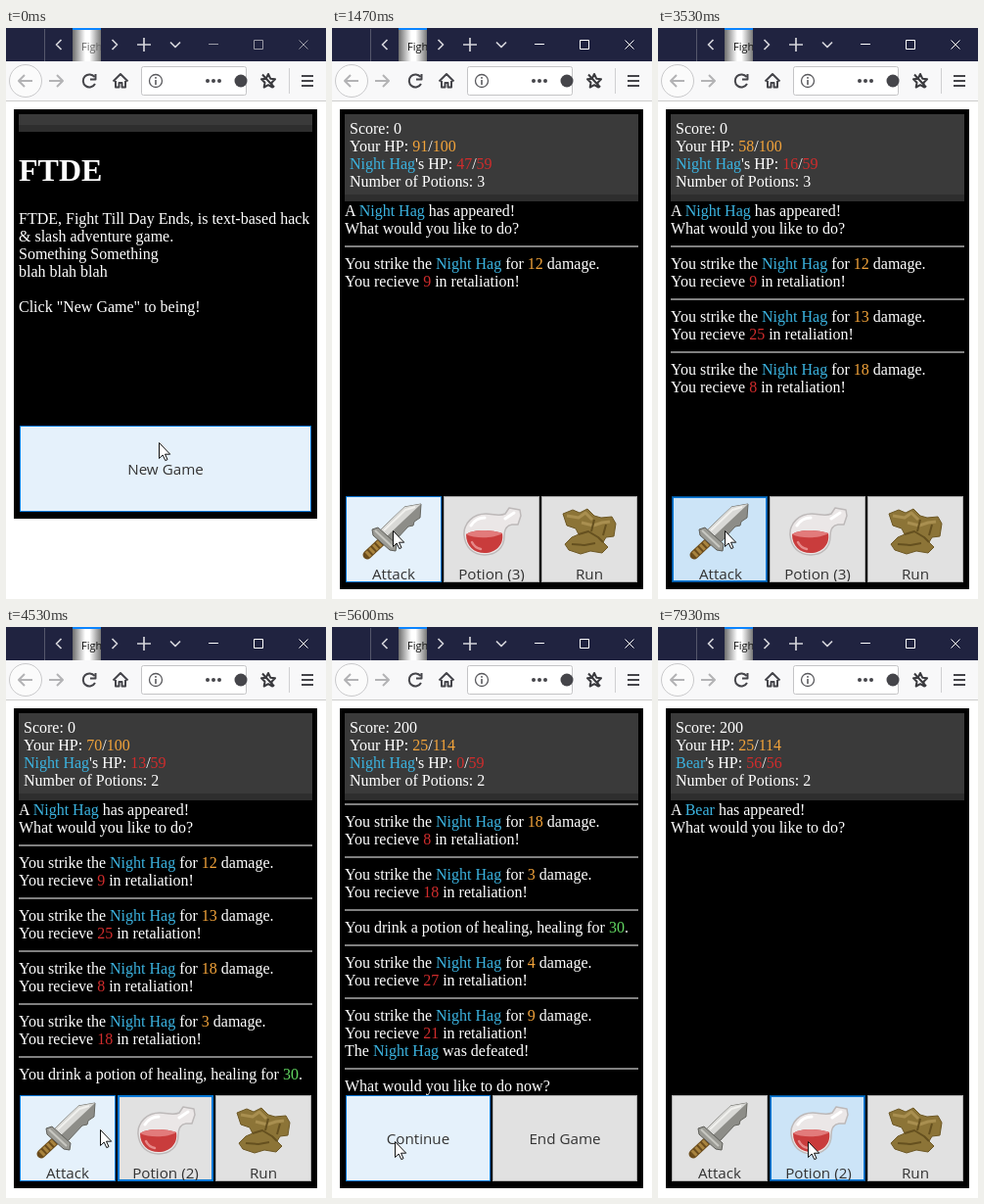
Animation of 327 by 583 pixels, one loop 8 s. Source, as an HTML page:

```html
<!DOCTYPE html>
<html lang="en">
<head>
<meta charset="utf-8">
<title>Fight Till Day Ends</title>
<style>
html, body { margin: 0; width: 100%; height: 100%; overflow: hidden; background: #fff; }
#stage { position: absolute; left: 0; top: 0; width: 327px; height: 583px; overflow: hidden; font: 16px/18px "Liberation Serif", "Times New Roman", serif; color: #fff; }
#stage > * { position: absolute; }
#chrome { left: 0; top: 0; }
#controls { stroke: #fff; }
.idle #controls { stroke: #9b9ba6; }
#tab { left: 68px; top: 0; width: 29px; height: 34px; overflow: hidden; background: linear-gradient(90deg, #6d6d6d, #fff 45%, #fff 60%, #777); border-top: 2px solid #0a84ff; box-sizing: border-box; font: 11px/33px "Open Sans", sans-serif; text-indent: 9px; white-space: nowrap; color: #111; }
.idle #tab { color: #666; }
#game { left: 8px; top: 83px; width: 310px; height: 490px; background: #000; }
#stats { left: 13px; top: 88px; width: 290px; height: 76px; padding: 6px 5px 7px; background: linear-gradient(#3a3a3a calc(100% - 7px), #2e2e2e 0); white-space: nowrap; }
#log { left: 13px; top: 178px; width: 302px; height: 300px; overflow: hidden; white-space: nowrap; }
#log hr { width: 300px; height: 2px; margin: 8px 0; border: 0; background: #808080; }
.start #game { height: 418px; }
.start #stats { height: 5px; }
.start #log { top: 106px; }
h1 { margin: 21px 0 22px; font-size: 32px; line-height: 37px; }
i { font-style: normal; }
.foe { color: #3bb3e0; }
.gold { color: #f2a33a; }
.red { color: #d02c2c; }
.green { color: #62d862; }
.btn { position: absolute; top: 478px; height: 88px; box-sizing: border-box; background: #e1e1e1; border: 1px solid #adadad; color: #333; font: 15.2px/22px "Open Sans", sans-serif; text-align: center; overflow: hidden; }
.btn svg { position: absolute; left: -1px; top: -1px; }
.btn span { position: absolute; left: -1px; right: -1px; top: 32px; }
.btn.pic span { top: 67px; }
.btn.focus { border-color: #0078d7; box-shadow: inset 0 0 0 1px #0078d7; }
.btn.hover { background: #e5f1fb; border-color: #0078d7; box-shadow: none; }
.btn.down { background: #cce4f7; border-color: #005499; }
.btn.down > * { transform: translateX(1px); }
#cursor { left: 0; top: 0; }
</style>
</head>
<body>
<div id="stage">
  <svg id="chrome" width="327" height="76" fill="none" stroke-linejoin="round">
    <path fill="#202340" d="M0 0H327V34H0Z"/>
    <path fill="#f8f8f9" d="M0 34H327V74H0Z"/>
    <path stroke="#ccc" d="M0 74.5H327"/>
    <path stroke="#55576c" d="M39.5 1V34"/>
    <g stroke="#d4d4da" stroke-width="1.7">
      <path d="M56.500 12L51.500 17L56.500 22M108.500 12L113.500 17L108.500 22M134 17H148M141 10V24M168 14.500L173 19.500L178 14.500"/>
    </g>
    <path id="controls" d="M207 16.500H217M253.500 12.500H262.500V21.500H253.500ZM299.500 12.500L308.500 21.500M308.500 12.500L299.500 21.500"/>
    <circle cx="20" cy="54" r="16.500" fill="#fbfbfb" stroke="#c9c9cb"/>
    <path stroke="#b3b3b5" stroke-width="2" d="M13 54H27M19 48L13 54L19 60M44 54H58M52 48L58 54L52 60"/>
    <g stroke="#45454a" stroke-width="2">
      <path d="M90.500 50A6.500 6.500 0 1 0 91 57M91.500 47V52.500H86"/>
      <path d="M109.500 54.500L117 47L124.500 54.500M112 54V60.500H115.500V56H118.500V60.500H122V54"/>
    </g>
    <rect x="138.500" y="39.500" width="107" height="29" rx="2" fill="#fff" stroke="#c4c4c6"/>
    <circle cx="153" cy="54" r="6.500" stroke="#5a5a5e" stroke-width="1.300"/>
    <path stroke="#5a5a5e" stroke-width="1.600" d="M153 50V51.700M153 53V58"/>
    <g fill="#45454a">
      <circle cx="206" cy="54" r="2"/><circle cx="212" cy="54" r="2"/><circle cx="218" cy="54" r="2"/>
      <circle cx="240" cy="54" r="6.500"/>
    </g>
    <path stroke="#39393d" stroke-width="2" d="M268 47L270.200 51.700L275 52.300L271.500 55.800L272.300 60.500L268 58.200L263.700 60.500L264.500 55.800L261 52.300L265.800 51.700ZM262 47.500L274 60.500"/>
    <path stroke="#d0d0d2" d="M289.500 41V67"/>
    <path stroke="#45454a" stroke-width="2" d="M302 49H314M302 54H314M302 59H314"/>
  </svg>
  <div id="tab">Fight Till Day Ends</div>
  <div id="game"></div>
  <div id="log"></div>
  <div id="stats"></div>
  <div id="buttons" style="left:0;top:0"></div>
  <svg id="cursor" width="14" height="21"><path d="M.5 .5V16.500L4.200 13L6.800 18.600L9 17.600L6.500 12.200H11.700Z" fill="#fff" stroke="#111"/></svg>
</div>

<script>
const $ = id => document.getElementById(id);
const tint = cls => s => `<i class="${cls}">${s}</i>`;
const foe = tint('foe'), gold = tint('gold'), red = tint('red'), green = tint('green');

const icon = body => `<svg width="98" height="88" stroke-linejoin="round">${body}</svg>`;
const sword = icon(`
  <path d="M22 60L37 46" stroke="#6b4c1c" stroke-width="9" stroke-linecap="round"/>
  <path d="M22 60L37 46" stroke="#a9843f" stroke-width="7" stroke-dasharray="3 2"/>
  <path d="M35 35L60 11L77 8L76 22L70 26L69 30L64 31L49 47Z" fill="#8d8d88" stroke="#666660"/>
  <path d="M35 35L60 11L77 8L42 41Z" fill="#d9d9d6"/>
  <path d="M39 35L61 14L71 11" fill="none" stroke="#f1f1ee" stroke-width="2"/>
  <path d="M27 34L33 32L52 49L51 56L45 55L28 40Z" fill="#9b9b95" stroke="#5d5d58"/>
  <path d="M30 35L48 52" stroke="#c8c8c2" stroke-width="2"/>`);
const flask = icon(`
  <path d="M21 40C20 27 31 18 43 18C51 18 57 21 63 18L67 12L78 14L79 20L76 29L70 29C63 30 62 36 62 41C62 53 53 60 42 60C30 60 22 52 21 40Z" fill="#ebe7e7" stroke="#bdb9b9" stroke-width="1.500"/>
  <path d="M23 39C32 33 51 35 60 38C62 50 53 58 42 58C31 58 23 51 23 39Z" fill="#c93c3c"/>
  <path d="M23 39C32 33 51 35 60 38C52 43 33 44 23 39Z" fill="#e27b7b"/>
  <path d="M28 30Q33 22 42 22M63 23L72 17" fill="none" stroke="#fff" stroke-width="3" stroke-linecap="round"/>
  <path d="M29 47Q32 53 38 54" fill="none" stroke="#e68a8a" stroke-width="2.500" stroke-linecap="round"/>`);
const boot = icon(`
  <path d="M22 18L32 14L39 17L47 13L54 20L61 22L72 21L76 28L74 41L66 42L63 47L68 52L62 58L50 56L40 59L28 55L24 49L31 42L38 39L35 33L26 30Z" fill="#8c7437" stroke="#6d5826"/>
  <path d="M26 20L38 22L45 17L52 24M41 27L53 30L62 27L70 26" fill="none" stroke="#a98f50" stroke-width="3"/>
  <path d="M38 39L48 36L58 42L63 47M31 49L44 50L55 48M54 24L51 36M66 29L63 40" fill="none" stroke="#65501f" stroke-width="2"/>`);

const fightButtons = n => [['Attack', sword], [`Potion (${n})`, flask], ['Run', boot]];
const intro = name => `A ${foe(name)} has appeared!<br>What would you like to do?`;
const strike = (hit, hurt) => `<hr>You strike the ${foe('Night Hag')} for ${gold(hit)} damage.<br>You recieve ${red(hurt)} in retaliation!`;
const stats = (score, hp, max, name, left, full, potions) =>
  `Score: ${score}<br>Your HP: ${gold(hp)}/${gold(max)}<br>${foe(name)}'s HP: ${red(left)}/${red(full)}<br>Number of Potions: ${potions}`;

// Screens begin at a tick; there are 15 ticks per second.
const screens = [{
  at: 0, from: 0, cls: 'start', stats: '', buttons: [['New Game']],
  log: '<h1>FTDE</h1>FTDE, Fight Till Day Ends, is text-based hack<br>&amp; slash adventure game.<br>Something Something<br>blah blah blah<br><br>Click "New Game" to being!'
}];
let story = intro('Night Hag');
function hag(at, text, hp, left, potions) {
  story += text;
  screens.push({ at, from: 3, log: story, stats: stats(0, hp, 100, 'Night Hag', left, 59, potions), buttons: fightButtons(potions) });
}
hag(3, '', 100, 59, 3);
hag(18, strike(12, 9), 91, 47, 3);
hag(32, strike(13, 25), 66, 34, 3);
hag(43, strike(18, 8), 58, 16, 3);
hag(55, strike(3, 18), 40, 13, 3);
hag(66, `<hr>You drink a potion of healing, healing for ${green(30)}.`, 70, 13, 2);
hag(75, strike(4, 27), 43, 9, 2);
screens.push({
  at: 82, from: 82, buttons: [['Continue'], ['End Game']],
  log: story + strike(9, 21) + `<br>The ${foe('Night Hag')} was defeated!<hr>What would you like to do now?`,
  stats: stats(200, 25, 114, 'Night Hag', 0, 59, 2)
}, {
  at: 102, from: 102, buttons: fightButtons(2), log: intro('Bear'),
  stats: stats(200, 25, 114, 'Bear', 56, 56, 2)
});

// Presses: down tick, up tick, button index
const presses = [[1, 3, 0], [16, 18, 0], [30, 32, 0], [41, 43, 0], [53, 55, 0], [64, 66, 1], [73, 75, 0], [80, 82, 0], [101, 102, 0], [119, 120, 1]];
// Pointer: tick, x, y
const path = [[0, 156, 423], [3, 156, 423], [7, 130, 455], [13, 62, 512], [14, 58, 515], [18, 58, 515], [19, 60, 514], [21, 60, 514],
  [22, 62, 513], [24, 63, 515], [26, 62, 520], [33, 62, 520], [38, 68, 513], [55, 68, 513], [62, 140, 516], [66, 140, 516],
  [67, 118, 514], [68, 96, 513], [71, 72, 516], [72, 66, 520], [82, 66, 520], [84, 64, 525], [90, 64, 525], [91, 84, 525],
  [96, 84, 525], [97, 85, 525], [104, 85, 525], [107, 153, 525], [120, 153, 525]];

function pointer(tick) {
  const i = path.findIndex(p => p[0] > tick);
  const [t0, x0, y0] = path[i - 1], [t1, x1, y1] = path[i];
  const k = (tick - t0) / (t1 - t0);
  return [Math.round(x0 + (x1 - x0) * k), Math.round(y0 + (y1 - y0) * k)];
}

function drawButtons(screen, tick, x, y) {
  const list = screen.buttons, start = screen.cls === 'start';
  const top = start ? 406 : 478;
  const width = (300 - 2 * list.length) / list.length;
  const press = presses.filter(p => p[0] <= tick && p[0] >= screen.from).pop();
  $('buttons').innerHTML = list.map(([label, pic = ''], i) => {
    const left = 14 + i * (width + 2);
    const cls = ['btn'];
    if (pic) cls.push('pic');
    if (press && press[2] === i) {
      cls.push('focus');
      if (tick < press[1]) cls.push('down');
    }
    if (x >= left && x < left + width && y >= top && y < top + 88) cls.push('hover');
    if (cls.includes('down')) cls.splice(cls.indexOf('hover'), 1);
    return `<div class="${cls.join(' ')}" style="left:${left}px;top:${top}px;width:${width}px">${pic}<span>${label}</span></div>`;
  }).join('');
}

let shown, lastTick;
function draw(tick) {
  const screen = screens.filter(s => s.at <= tick).pop();
  if (screen !== shown) {
    shown = screen;
    $('stats').innerHTML = screen.stats;
    $('log').innerHTML = screen.log;
  }
  $('stage').className = (screen.cls || '') + (tick < 1 ? ' idle' : '');
  $('log').scrollTop = $('log').scrollHeight;
  const [x, y] = pointer(tick);
  drawButtons(screen, tick, x, y);
  $('cursor').style.transform = `translate(${x}px, ${y}px)`;
}

const begin = performance.now();
function frame() {
  const time = (performance.now() - begin) % 8000;
  const tick = Math.floor((time + 5) * 15 / 1000) % 120;
  if (tick !== lastTick) draw(lastTick = tick);
  requestAnimationFrame(frame);
}
frame();
</script>
</body>
</html>
```
